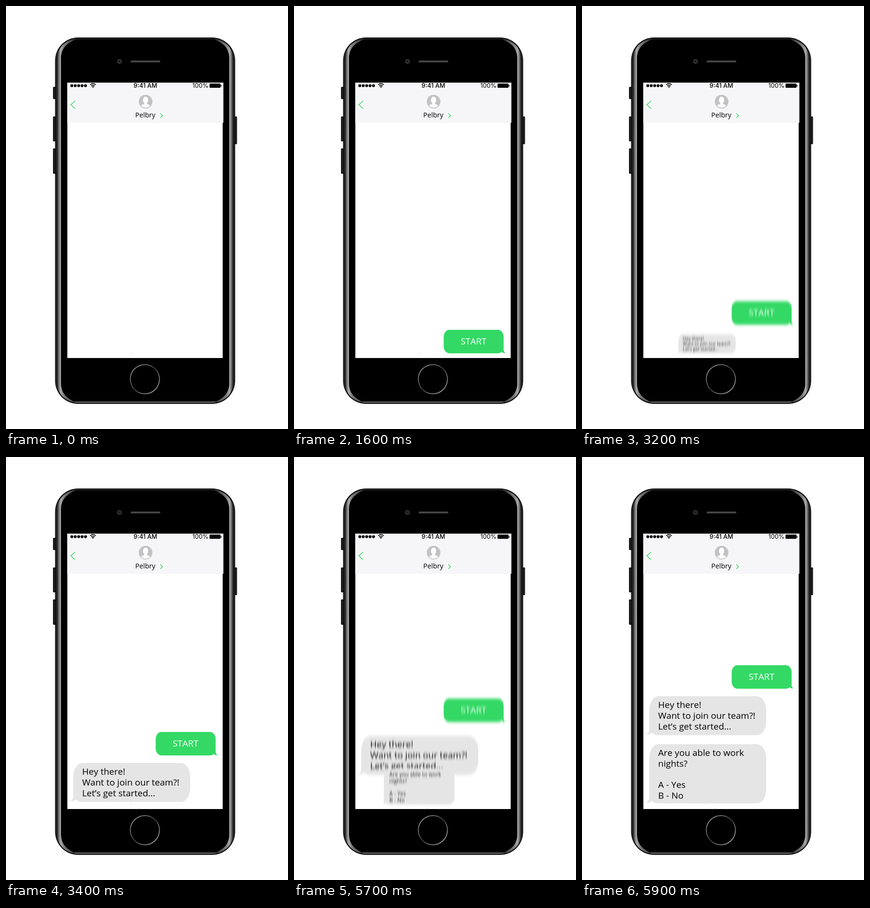
These frames come from a looping animation (600x900 px, 8000 ms). An HTML page:

```html
<!DOCTYPE html>
<html lang="en">
<head>
<meta charset="utf-8">
<title>Chat on a phone</title>
<style>
  html, body { margin: 0; height: 100%; overflow: hidden; background: #fff; }
  svg { display: block; width: 600px; height: 900px; }
  .chat text, .name { font-family: "Open Sans", "Noto Sans", sans-serif; font-kerning: none; }
  .chat text { font-size: 19px; }
  .status { font: 500 13px Inter, Roboto, sans-serif; }
</style>
</head>
<body>
<svg viewBox="0 0 600 900">
  <defs>
    <clipPath id="screen"><rect x="130" y="163" width="331" height="587"/></clipPath>
    <clipPath id="face"><circle cx="297" cy="203.5" r="12.8"/></clipPath>
    <linearGradient id="metal">
      <stop stop-color="#333"/><stop offset=".1" stop-color="#777"/>
      <stop offset=".18" stop-color="#aaa"/><stop offset=".4" stop-color="#777"/>
      <stop offset="1" stop-color="#444"/>
    </linearGradient>
    <linearGradient id="ring" x2="1" y2="1">
      <stop offset=".1" stop-color="#888"/><stop offset=".5" stop-color="#3a3a3a"/>
      <stop offset=".9" stop-color="#999"/>
    </linearGradient>
    <path id="edge" fill="url(#metal)" d="M148 71C121 74 109 92 109 116V798C109 822 121 840 148 843C127 834 117 822 117 802V112C117 92 127 80 148 71Z"/>
  </defs>

  <g fill="#222" stroke="#000">
    <rect x="100.5" y="172.5" width="6" height="25" rx="1"/>
    <rect x="100.5" y="235.5" width="6" height="52" rx="1"/>
    <rect x="100.5" y="303.5" width="6" height="53" rx="1"/>
    <rect x="485" y="235.5" width="6" height="58" rx="1"/>
  </g>
  <rect x="104.5" y="67" width="383" height="779.5" rx="49"/>
  <rect x="107" y="69.5" width="378" height="774.5" rx="46.5" fill="none" stroke="#2e2e2e" stroke-width="2"/>
  <use href="#edge"/>
  <use href="#edge" transform="matrix(-1 0 0 1 592 0)"/>
  <path fill="none" stroke="#8a8a8a" stroke-width="1.5" d="M146 842.5H446"/>
  <circle cx="241.5" cy="118" r="4.2" fill="#1c1c1c" stroke="#444" stroke-width="1.5"/>
  <rect x="265" y="116" width="63.5" height="4" rx="2" fill="#454545"/>
  <circle cx="295.5" cy="794" r="31" fill="none" stroke="url(#ring)" stroke-width="2"/>

  <rect x="130.5" y="163" width="330.5" height="586" fill="#fff"/>
  <g class="chat" clip-path="url(#screen)">
    <circle cx="266.3" cy="738.3" r=".8" fill="#bbb"/>
    <g id="messages"></g>
  </g>

  <rect x="130.5" y="163" width="332" height="85.5" fill="#f6f6f8"/>
  <g id="signal"></g>
  <g fill="none" stroke="#000" stroke-width="1.8">
    <path d="M179 167.6Q185 162.4 191 167.6M181.3 170.2Q185 167 188.7 170.2"/>
    <path fill="#000" stroke="none" d="M182.8 171.6Q185 169.8 187.2 171.6L185 174Z"/>
  </g>
  <text class="status" x="296.5" y="174" text-anchor="middle">9:41 AM</text>
  <text class="status" x="396.5" y="174" style="font-weight:400">100%</text>
  <rect x="433" y="165" width="23.5" height="9" rx="1.5"/>
  <rect x="457" y="168" width="1.5" height="3.5" rx=".7"/>
  <g fill="none" stroke="#33d964" stroke-width="1.5">
    <path d="M147 202L138 210L147 218.5"/>
    <path d="M328.5 228.5L333 233.2L328.5 238"/>
  </g>
  <circle cx="297" cy="203.5" r="14.5" fill="#c2c2c2"/>
  <g clip-path="url(#face)" fill="#fff">
    <ellipse cx="297" cy="200" rx="5.7" ry="7.2"/>
    <path d="M294 204H300V208.5Q308 210.5 310 217H284Q286 210.5 294 208.5Z"/>
  </g>
  <text class="name" x="275" y="237" font-size="14.6">Pelbry</text>
</svg>

<script>
const LOOP = 8000, STEP = 100;
const ANCHOR = { x: 265, y: 744 };

// Each move has a start and a duration in ms; the second push reaches the lower bubble a little later.
const slideIn = [1270, 300];
const push1 = [3034, 300], grow1 = [3052, 300];
const push2 = [5600, 200], push2Late = [5606, 214], grow2 = [5530, 300];

const phase = ([start, length], t) => Math.min(1, Math.max(0, (t - start) / length));
const ease = (move, t) => (1 - Math.cos(Math.PI * phase(move, t))) / 2;
const speed = (move, t) => Math.sin(Math.PI * phase(move, t));

const line = (text, y) => `<text x="162" y="${y}">${text}</text>`;

function greyBubble(top, bottom, lines) {
  return `<rect x="143" y="${top}" width="249" height="${bottom - top}" rx="20" ry="30" fill="#e5e5e5"/>
    <path fill="#e5e5e5" d="M143 ${bottom - 32}V${bottom - 13}Q143 ${bottom - 5} 137 ${bottom - 2.5}Q145 ${bottom} 149 ${bottom - 6}Q151 ${bottom} 165 ${bottom}Z"/>
    ${lines}`;
}

const messages = [
  {
    art: `<rect x="318.5" y="689" width="127.5" height="50" rx="12" ry="15" fill="#33d964"/>
      <path fill="#33d964" d="M446 715V731Q446 736 450 738Q445 739.5 441.5 735.5Q439 739 430 739Z"/>
      <text x="382" y="720" fill="#fff" text-anchor="middle">START</text>`,
    y: t => 62 * (1 - ease(slideIn, t)) - 104 * ease(push1, t) - 142 * ease(push2, t),
    moves: [slideIn, push1, push2],
  },
  {
    art: greyBubble(651, 734,
      line("Hey there!", 676) + line("Want to join our team?!", 699) + line("Let’s get started...", 721.5)),
    y: t => -142 * ease(push2Late, t),
    scale: t => ease(grow1, t),
    moves: [grow1, push2Late],
  },
  {
    art: greyBubble(611, 737,
      line("Are you able to work", 636) + line("nights?", 659) + line("A - Yes", 704) + line("B - No", 727)),
    y: () => 0,
    scale: t => ease(grow2, t),
    moves: [grow2],
  },
];

document.getElementById("signal").innerHTML =
  [0, 1, 2, 3, 4].map(i => `<circle cx="${140 + i * 7.3}" cy="169.5" r="3.1"/>`).join("");

document.getElementById("messages").innerHTML = messages.map((m, i) => `
  <filter id="blur${i}" filterUnits="userSpaceOnUse" x="100" y="400" width="400" height="450" color-interpolation-filters="sRGB">
    <feGaussianBlur stdDeviation="0"/>
  </filter>
  <g class="message"><g>${m.art}</g></g>`).join("");

const layers = [...document.querySelectorAll(".message")];
const blurs = [...document.querySelectorAll("feGaussianBlur")];

function draw(now) {
  const t = Math.floor((now % LOOP) / STEP) * STEP;
  messages.forEach((m, i) => {
    const scale = m.scale ? m.scale(t) : 1;
    const blur = 3.4 * Math.max(...m.moves.map(move => speed(move, t)));
    layers[i].firstElementChild.setAttribute("transform",
      `translate(${ANCHOR.x} ${ANCHOR.y + m.y(t)}) scale(${scale}) translate(${-ANCHOR.x} ${-ANCHOR.y})`);
    layers[i].setAttribute("visibility", scale ? "visible" : "hidden");
    blurs[i].setAttribute("stdDeviation", `0 ${blur}`);
    layers[i].setAttribute("filter", blur > 0.5 ? `url(#blur${i})` : "none");
  });
  requestAnimationFrame(draw);
}
requestAnimationFrame(draw);
</script>
</body>
</html>
```
